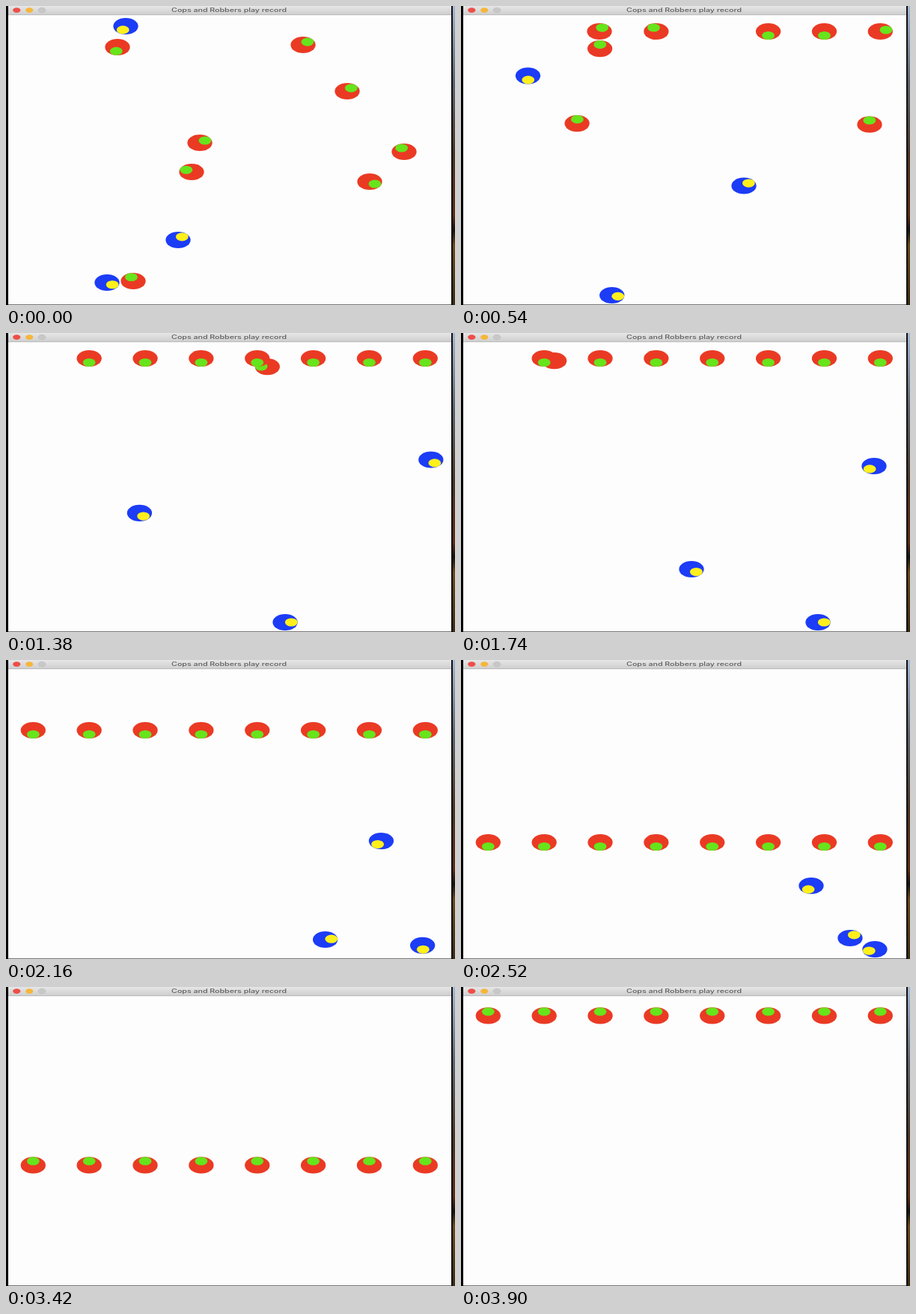
An HTML page that plays this animation: 600 px wide and 400 px high, repeating every 3.96 s.

```html
<!DOCTYPE html>
<html lang="en">
<head>
<meta charset="utf-8">
<title>Cops and Robbers play record</title>
<style>
  html, body { margin: 0; width: 100%; height: 100%; overflow: hidden; background: #fdfdfd; }
  svg { display: block; width: 600px; height: 400px; }
  text { font: 500 7.1px Inter, "Open Sans", sans-serif; fill: #5c5c5c; text-anchor: middle; }
</style>
</head>
<body>
<svg viewBox="0 0 600 400">
  <defs>
    <linearGradient id="bar" x2="0" y2="1">
      <stop offset="0" stop-color="#e6e6e6"/>
      <stop offset="1" stop-color="#cecece"/>
    </linearGradient>
    <linearGradient id="desk" x2="0" y2="1">
      <stop offset="0" stop-color="#a4b8d4"/>
      <stop offset=".25" stop-color="#5c6470"/>
      <stop offset=".5" stop-color="#4a3424"/>
      <stop offset=".7" stop-color="#5c2c14"/>
      <stop offset=".75" stop-color="#14100c"/>
      <stop offset=".8" stop-color="#6a4a1c"/>
      <stop offset="1" stop-color="#3c2c14"/>
    </linearGradient>
  </defs>
  <rect width="600" height="400" fill="#fdfdfd"/>
  <rect x="3" width="592" height="12" fill="url(#bar)"/>
  <rect x="3" y="11.4" width="592" height=".8" fill="#b0b0b0"/>
  <!-- the window is a square view widened to 3:2 -->
  <g transform="scale(1.5 1)">
    <circle cx="9.5" cy="5.6" r="3.4" fill="#ee4e48"/>
    <circle cx="20.8" cy="5.6" r="3.4" fill="#f6b63a"/>
    <circle cx="32" cy="5.6" r="3.3" fill="#c8c8c8" stroke="#b4b4b4" stroke-width=".4"/>
    <text x="198.7" y="8.3">Cops and Robbers play record</text>
    <g id="field"></g>
  </g>
  <rect y="399" width="600" height="1" fill="#777"/>
  <rect width="3" height="400" fill="#000"/>
  <rect x="595" width="5" height="400" fill="url(#desk)"/>
  <rect x="595" width="2" height="400" fill="#101010"/>
</svg>
<script>
const STEP = 60, LOOP = 3960, WIDE = 1.5;
const SPEED = 25, TURN = 43.5, COP_SPEED = 8; // per step
const TOP = 34, BOTTOM = 377, MARCH = 33.6, REACH = 22;

const field = document.getElementById('field');
const mix = (a, b, p) => a + (b - a) * p;
const clamp = (v, lo, hi) => Math.min(hi, Math.max(lo, v));
const swing = (from, to) => ((to - from) % 360 + 540) % 360 - 180;
const inside = (x, y) => [clamp(x, 20, 579), clamp(y, 23, 387)];
const vector = (deg, len) => {
  const a = deg * Math.PI / 180;
  return [len * Math.cos(a), len * Math.sin(a)];
};
const ahead = (x, y, dir, len) => {
  const [dx, dy] = vector(dir, len);
  return inside(x + dx * WIDE, y + dy);
};

// One per place in the line; late ones pass a meeting point and leave it at a given step
const robbers = [
  { at: [486, 235, 33], via: [543, 52], leave: 15.85 },
  { at: [170, 368, -108], via: [156, 139], leave: 13.6 },
  { at: [248, 222, -150] },
  { at: [259, 183, -33] },
  { at: [149, 55, 102], via: [185, 34], leave: 12.25 },
  { at: [397, 52, -45] },
  { at: [456, 114, -50] },
  { at: [532, 195, -114] }
];

// Poses (x, y, heading) that each cop passes at the same steps
const beats = [0, 17, 29, 42];
const cops = [
  [[160, 27, 117], [74, 152, 62], [308, 316, 40], [520, 372, -50]],
  [[230, 313, -50], [527, 190, -30], [552, 178, 135], [468, 302, 118]],
  [[135, 370, 30], [269, 387, 0], [477, 387, 0], [553, 387, 158]]
];

// Turn on the spot, then walk straight, at fixed rates
function robberPose({ at: [x, y, dir], via, leave = 0 }, slot) {
  const home = 36.3 + slot * 74.86;
  const keys = [[0, x, y, dir]];
  let now = 0;
  const push = () => keys.push([now, x, y, dir]);
  const face = to => {
    const d = swing(dir, Math.round(to));
    now += Math.abs(d) / TURN;
    dir += d;
    push();
  };
  const walk = (toX, toY, depart = 0) => {
    now = Math.max(now, depart);
    push();
    const dx = (toX - x) / WIDE, dy = toY - y;
    face(Math.atan2(dy, dx) * 180 / Math.PI);
    now += Math.hypot(dx, dy) / SPEED;
    [x, y] = [toX, toY];
    push();
  };
  walk(...ahead(x, y, dir, 2 * SPEED));
  if (via) walk(...via);
  walk(home, TOP, leave);
  face(90);
  walk(home, BOTTOM, MARCH);
  walk(home, TOP + 4);

  return f => {
    const next = keys.findIndex(k => k[0] > f);
    if (next < 0) return [x, y, dir];
    const a = keys[next - 1], b = keys[next], p = (f - a[0]) / (b[0] - a[0]);
    return [1, 2, 3].map(k => mix(a[k], b[k], p));
  };
}

// Curve that leaves and arrives along the headings
function copPose(poses) {
  return f => {
    const i = beats.findLastIndex(b => b <= f);
    const [x, y, dir] = poses[i], past = f - beats[i];
    if (i === beats.length - 1) return [...ahead(x, y, dir, COP_SPEED * past), dir];
    const [toX, toY, toDir] = poses[i + 1], len = beats[i + 1] - beats[i], p = past / len;
    const pull = Math.max(Math.hypot((toX - x) / WIDE, toY - y), COP_SPEED * len);
    const [ox, oy] = vector(dir, pull * p * (1 - p) ** 2);
    const [ix, iy] = vector(toDir, pull * p * p * (p - 1));
    const h = p * p * (3 - 2 * p);
    return [...inside(mix(x, toX, h) + WIDE * (ox + ix), mix(y, toY, h) + oy + iy),
      dir + swing(dir, toDir) * p];
  };
}

// A cop is gone once the marching line comes within reach
const free = (f, y) => f < MARCH || TOP + SPEED * (f - MARCH) + REACH < y;

function circle(parent, r, fill) {
  const c = document.createElementNS('http://www.w3.org/2000/svg', 'circle');
  c.setAttribute('r', r);
  c.setAttribute('fill', fill);
  parent.append(c);
  return c;
}

function player(pose, body, eye, seen = () => true) {
  const g = document.createElementNS('http://www.w3.org/2000/svg', 'g');
  circle(g, 11.1, body);
  const dot = circle(g, 5.6, eye);
  field.append(g);
  return f => {
    const [x, y, dir] = pose(f), [dx, dy] = vector(dir, 5.5);
    g.style.display = seen(f, y) ? '' : 'none';
    g.setAttribute('transform', `translate(${x / WIDE} ${y})`);
    dot.setAttribute('cx', dx);
    dot.setAttribute('cy', dy);
  };
}

const players = [
  ...robbers.map((r, i) => player(robberPose(r, i), '#ea3a24', '#66e41c')),
  ...cops.map(c => player(copPose(c), '#1c3cf6', '#fff01c', free))
];

const start = performance.now();
function draw(now) {
  const f = Math.floor(Math.max(0, now - start) % LOOP / STEP);
  players.forEach(show => show(f));
  requestAnimationFrame(draw);
}
draw(start);
</script>
</body>
</html>
```
